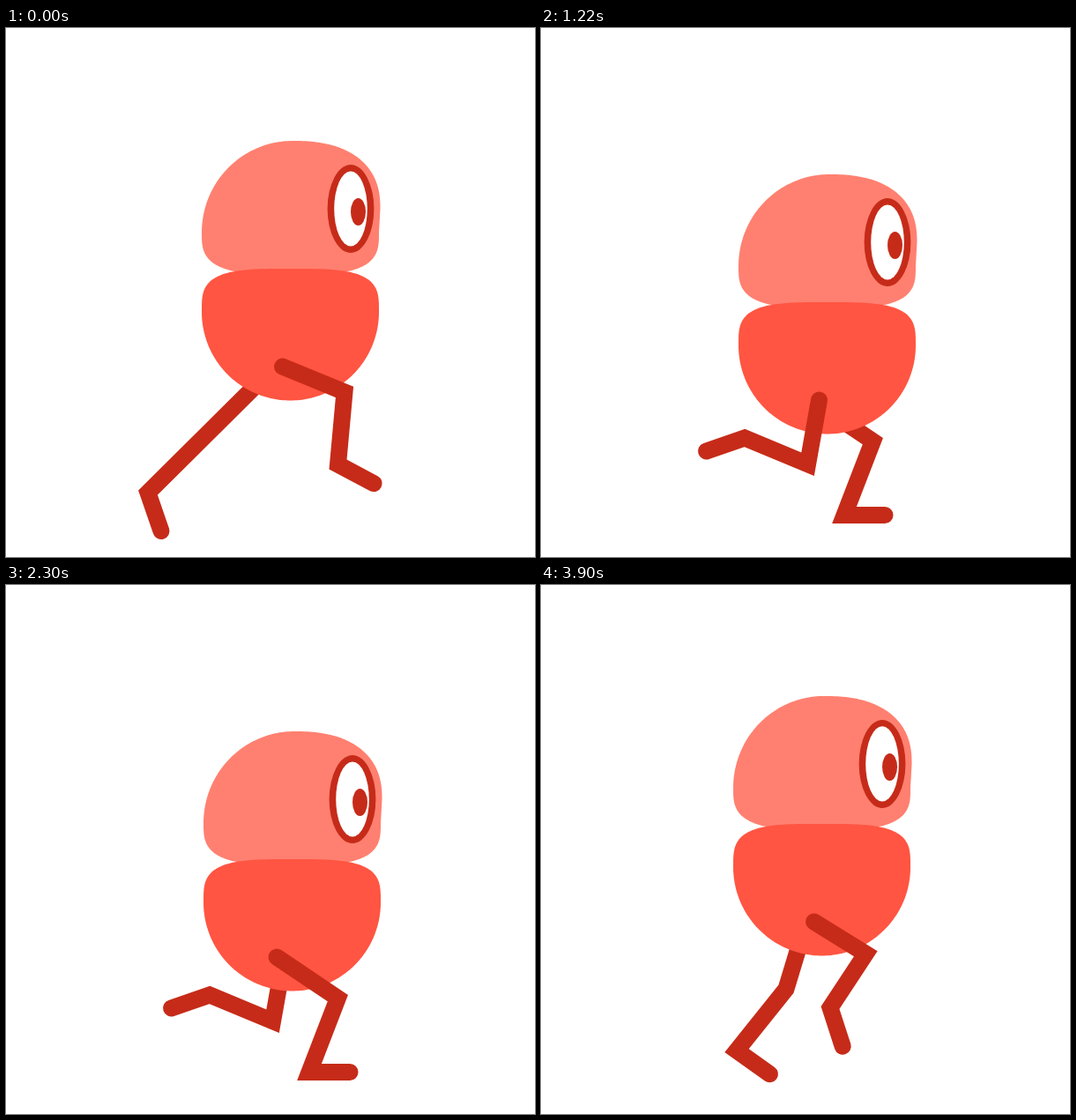
An HTML page with a canvas that plays this animation: 600 px wide and 600 px high, repeating every 3940 ms.

```html
<!DOCTYPE html>
<html lang="en">
<head>
<meta charset="utf-8">
<title>Runner</title>
<style>
  html, body { margin: 0; width: 100%; height: 100%; overflow: hidden; background: #fff; }
  canvas { display: block; }
</style>
</head>
<body>
<canvas id="stage" width="600" height="600"></canvas>
<script>
const ctx = document.getElementById('stage').getContext('2d');
const LIMB = '#c62b19', HEAD = '#ff8070', BODY = '#ff5542';
const LOOP = 3940, STRIDE = 440, LAST_STRIDE = 8 * STRIDE;
const STEPS = 12, TICK = 20;
const HOLDS = [1, 1, 3, 3, 1, 2, 3, 1, 2, 1, 2, 2]; // ticks per step
const FOOT = 46, KNEE_AT = 0.47;

// Key values by step for one leg; the other leg runs half a stride later.
const ankleX = { 1: 425, 2: 427, 3: 344, 6: 161, 7: 150, 8: 217, 9: 231 };
const ankleY = { 0: 474, 2: 555, 4: 550, 6: 506, 8: 406, 9: 465, 10: 485 };
const kneeBend = { 0: 47, 2: 12, 3: 54, 4: 32, 6: 0, 8: 52, 9: 59 };
const footAngle = { 0: 62, 2: 132, 3: 90, 4: 90, 6: 19, 9: -71, 11: 18 };

// Linear interpolation around the closed stride.
function track(keys, step) {
  const marks = Object.keys(keys).map(Number);
  const before = marks.filter(m => m <= step).pop() ?? marks.at(-1);
  const after = marks.find(m => m > step) ?? marks[0];
  const span = (after - before + STEPS) % STEPS;
  const part = ((step - before + STEPS) % STEPS) / span;
  return keys[before] + (keys[after] - keys[before]) * part;
}

function wave(angle, mean, cos1, sin1, cos2, sin2) {
  return mean + cos1 * Math.cos(angle) + sin1 * Math.sin(angle)
    + cos2 * Math.cos(2 * angle) + sin2 * Math.sin(2 * angle);
}

// The body bounces twice per stride, once for each leg.
function bodyOffset(step) {
  const angle = step * Math.PI / 3;
  return [
    wave(angle, -0.3, -1, 4.6, 1.3, -1.7),
    wave(angle, 9.3, -29.5, -7.2, -0.8, 3.75)
  ];
}

function drawLeg(step, [dx, dy]) {
  const swingsForward = (step + 3) % STEPS < 6;
  const hipX = (swingsForward ? 313.5 : 305) + dx, hipY = 384 + dy;
  const x = track(ankleX, step), y = track(ankleY, step);
  const vx = x - hipX, vy = y - hipY;
  const bend = track(kneeBend, step) / Math.hypot(vx, vy);
  const tilt = track(footAngle, step) * Math.PI / 180;

  ctx.beginPath();
  ctx.moveTo(hipX, hipY);
  ctx.lineTo(hipX + vx * KNEE_AT + vy * bend, hipY + vy * KNEE_AT - vx * bend);
  ctx.lineTo(x, y);
  ctx.lineTo(x + FOOT * Math.sin(tilt), y + FOOT * Math.cos(tilt));
  ctx.strokeStyle = LIMB;
  ctx.lineWidth = 19;
  ctx.lineCap = 'round';
  ctx.lineJoin = 'miter';
  ctx.stroke();
}

// Four superellipse corners, clockwise from the lower right.
function blob(color, cx, corners) {
  const power = (v, n) => Math.sign(v) * Math.abs(v) ** (2 / n);
  ctx.beginPath();
  corners.forEach(({ cy, rx, ry, n }, quarter) => {
    for (let i = 0; i <= 60; i++) {
      const a = (quarter + i / 60) * Math.PI / 2;
      ctx.lineTo(cx + rx * power(Math.cos(a), n), cy + ry * power(Math.sin(a), n));
    }
  });
  ctx.fillStyle = color;
  ctx.fill();
}

function oval(x, y, rx, ry, color) {
  ctx.beginPath();
  ctx.ellipse(x, y, rx, ry, 0, 0, Math.PI * 2);
  ctx.fillStyle = color;
  ctx.fill();
}

function drawTorso([dx, dy]) {
  const round = { cy: 322, rx: 100.5, ry: 100.5, n: 2 };
  const shoulder = { cy: 322, rx: 100.5, ry: 49, n: 3.5 };
  ctx.save();
  ctx.translate(dx, dy);
  blob(HEAD, 325, [
    { cy: 232, rx: 98, ry: 48, n: 3.2 },
    { cy: 232, rx: 103, ry: 48, n: 3.2 },
    { cy: 232, rx: 103, ry: 104, n: 2 },
    { cy: 205, rx: 99.5, ry: 77, n: 2.4 }
  ]);
  blob(BODY, 322.5, [round, round, shoulder, shoulder]);
  oval(391, 205, 26.4, 50, LIMB);
  oval(391, 205, 18.8, 42.6, '#fff');
  oval(399.5, 208.5, 8.5, 15.5, LIMB);
  ctx.restore();
}

function drawRunner(step) {
  const offset = bodyOffset(step);
  ctx.save();
  // The near leg pushes off from a lower crouch.
  if (step === 0) ctx.translate(0, 21);
  drawLeg((step + 6) % STEPS, offset);
  drawTorso(offset);
  drawLeg(step, offset);
  ctx.restore();
}

function stepAt(phase) {
  let step = 0;
  for (let end = HOLDS[0] * TICK; phase >= end; end += HOLDS[step] * TICK) step++;
  return step;
}

function render(now) {
  const t = now % LOOP;
  // The final stride skips its first step.
  const phase = (t < LAST_STRIDE ? t : t + TICK) % STRIDE;
  ctx.fillStyle = '#fff';
  ctx.fillRect(0, 0, 600, 600);
  drawRunner(stepAt(phase));
}

let origin;
function tick(now) {
  origin ??= now;
  render(Math.max(0, now - origin));
  requestAnimationFrame(tick);
}
render(0);
requestAnimationFrame(tick);
</script>
</body>
</html>
```
